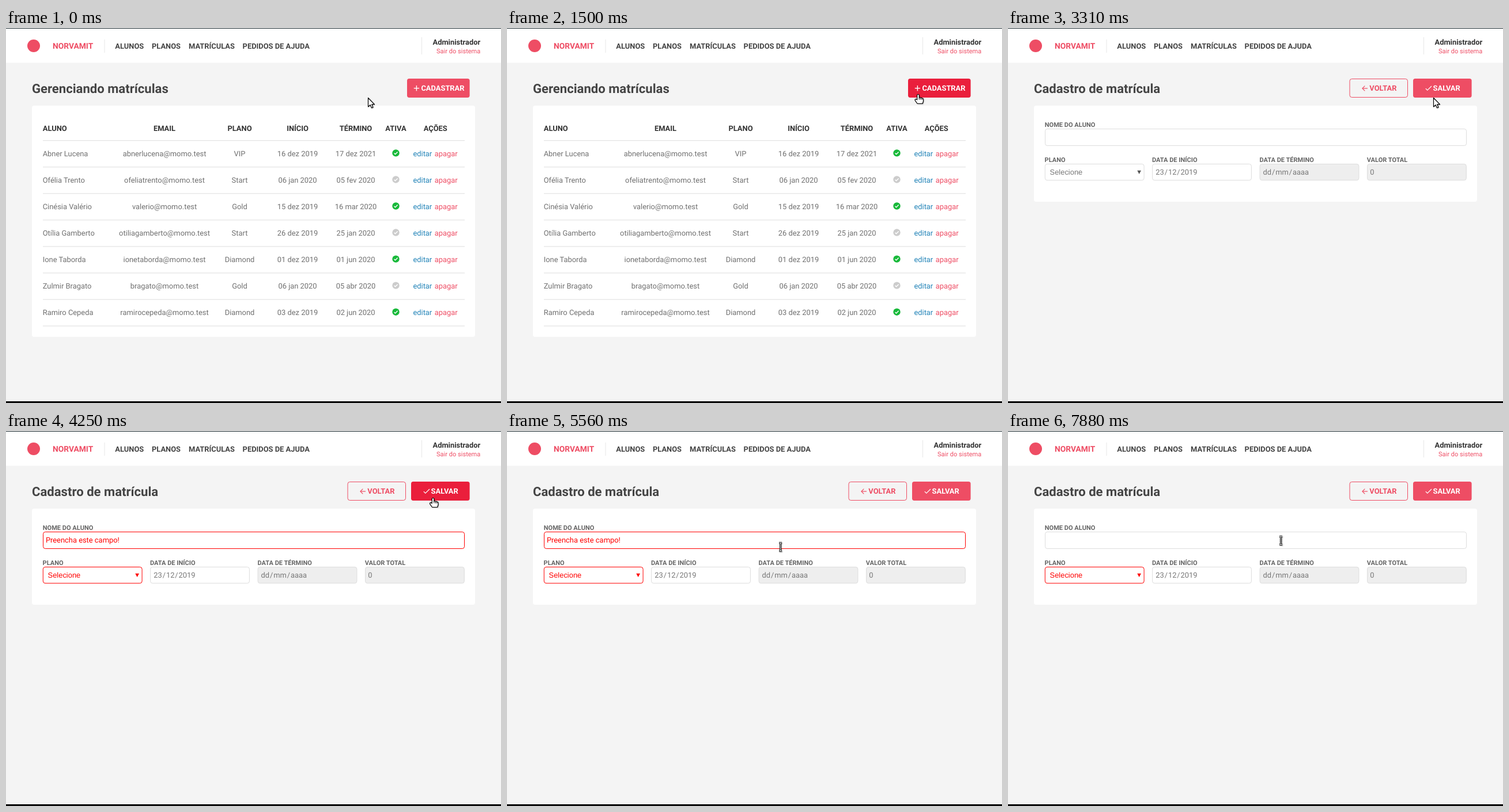
Write an HTML page with a canvas that moves like this. It is 859x652 px and loops after 8000 ms.

```html
<!DOCTYPE html>
<html lang="pt-BR">
<head>
<meta charset="utf-8">
<title>Matrículas</title>
<style>
html, body { margin: 0; width: 100%; height: 100%; overflow: hidden; background: #f4f4f4; }
canvas { display: block; width: 859px; height: 652px; }
</style>
</head>
<body>
<canvas id="stage"></canvas>
<script>
const W = 859, H = 652, LOOP = 8000;
const canvas = document.getElementById('stage');
const ctx = canvas.getContext('2d');
const dpr = window.devicePixelRatio || 1;
canvas.width = W * dpr;
canvas.height = H * dpr;
ctx.textRendering = 'geometricPrecision';

const PINK = '#ee4d64', HOVER = '#ea1f3c', RED = '#ff0000', DARK = '#444', GRAY = '#707070';
const ROBOTO = 'Roboto, sans-serif', ARIAL = '"Liberation Sans", Arial, sans-serif';
const BODY = 12.9, SMALL = 11.05, ROW = 46.05;

const FORM_AT = 2560, ERROR_AT = 4250, FOCUS_AT = 6130;
const ADD_BTN = { x: 696, y: 88, w: 108.6, h: 33 };
const SAVE_BTN = { x: 703, y: 88, w: 101.6, h: 33 };
const NAME_FIELD = { x: 64.5, y: 175.5, w: 731, h: 29 };

const rows = [
  ['Abner Lucena', 'abnerlucena', 'VIP', '16 dez 2019', '17 dez 2021', true],
  ['Ofélia Trento', 'ofeliatrento', 'Start', '06 jan 2020', '05 fev 2020', false],
  ['Cinésia Valério', 'valerio', 'Gold', '15 dez 2019', '16 mar 2020', true],
  ['Otília Gamberto', 'otiliagamberto', 'Start', '26 dez 2019', '25 jan 2020', false],
  ['Ione Taborda', 'ionetaborda', 'Diamond', '01 dez 2019', '01 jun 2020', true],
  ['Zulmir Bragato', 'bragato', 'Gold', '06 jan 2020', '05 abr 2020', false],
  ['Ramiro Cepeda', 'ramirocepeda', 'Diamond', '03 dez 2019', '02 jun 2020', true]
];

// Pointer moves: start, end, number of steps, target x and y, easing power
const moves = [
  [1130, 1500, 7, 713.5, 115.5, 2],
  [2560, 2560, 1, 725.5, 110, 1],
  [2690, 3310, 9, 738.5, 121.5, 1],
  [3440, 3500, 2, 741, 116.5, 1],
  [4750, 4940, 3, 746, 119.5, 1],
  [5250, 5560, 4, 474.5, 201.5, 2],
  [5690, 5690, 1, 474.5, 202.5, 1],
  [5880, 6130, 3, 474.5, 191.5, 1],
  [6310, 6310, 1, 473.5, 190.5, 1]
];

function pointerAt(t) {
  let x = 628.5, y = 121.5;
  for (const [start, end, n, tx, ty, power] of moves) {
    if (t < start) break;
    const gap = n > 1 ? (end - start) / (n - 1) : 1;
    const step = Math.min(n, Math.floor((t - start) / gap + 1e-6) + 1);
    const p = 1 - Math.pow(1 - step / n, power);
    x += (tx - x) * p;
    y += (ty - y) * p;
  }
  return { x, y };
}

function inside(p, r) {
  return p.x >= r.x && p.x <= r.x + r.w && p.y >= r.y && p.y <= r.y + r.h;
}

function text(s, x, y, { size = BODY, color = GRAY, bold = false, align = 'left', face = ROBOTO } = {}) {
  ctx.font = `${bold ? 700 : 400} ${size}px ${face}`;
  ctx.fillStyle = color;
  ctx.textAlign = align;
  ctx.fillText(s, x, y);
  return ctx.measureText(s).width;
}

function rect(x, y, w, h, color) {
  ctx.fillStyle = color;
  ctx.fillRect(x, y, w, h);
}

function box({ x, y, w, h }, fill, stroke, r = 3.7) {
  ctx.beginPath();
  ctx.roundRect(x, y, w, h, r);
  if (fill) { ctx.fillStyle = fill; ctx.fill(); }
  if (stroke) { ctx.strokeStyle = stroke; ctx.lineWidth = 1; ctx.stroke(); }
}

function disc(x, y, r, color) {
  ctx.beginPath();
  ctx.arc(x, y, r, 0, Math.PI * 2);
  ctx.fillStyle = color;
  ctx.fill();
}

function line(points, color, width) {
  ctx.beginPath();
  points.forEach(([x, y]) => ctx.lineTo(x, y));
  ctx.strokeStyle = color;
  ctx.lineWidth = width;
  ctx.stroke();
}

function header() {
  rect(0, 0, W, H, '#f4f4f4');
  rect(0, 0, W, 60.5, '#fff');
  rect(0, 0, W, 1, '#1d2b30');
  rect(0, 649, W, 3, '#000');
  disc(48, 31, 11, PINK);
  text('NORVAMIT', 81, 36, { size: 13.8, bold: true, color: PINK });
  rect(170.5, 20, 1, 23, '#e8e8e8');
  rect(721, 16, 1, 30, '#e8e8e8');
  const nav = [['ALUNOS', 189.3], ['PLANOS', 253], ['MATRÍCULAS', 317], ['PEDIDOS DE AJUDA', 410.6]];
  nav.forEach(([s, x]) => text(s, x, 35.6, { bold: true, color: DARK }));
  text('Administrador', 823.3, 28.6, { bold: true, color: '#333', align: 'right' });
  text('Sair do sistema', 823.3, 43.6, { size: SMALL, color: PINK, align: 'right' });
}

function title(s) {
  text(s, 45, 112.6, { size: 22.1, bold: true, color: DARK });
}

function status(x, y, active) {
  disc(x, y, 6.2, active ? '#18b93a' : '#ccc');
  line([[x - 3, y + 0.2], [x - 1, y + 2.2], [x + 3.1, y - 2]], '#fff', 1.4);
}

function listPage(pointer) {
  title('Gerenciando matrículas');
  box(ADD_BTN, inside(pointer, ADD_BTN) ? HOVER : PINK);
  line([[707.8, 104.7], [717, 104.7]], '#fff', 1.4);
  line([[712.4, 100], [712.4, 109.4]], '#fff', 1.4);
  text('CADASTRAR', 720.4, 109.2, { bold: true, color: '#fff' });
  box({ x: 45, y: 135, w: 769, h: 402 }, '#fff');

  const head = { bold: true, color: '#333', align: 'center' };
  text('ALUNO', 63.7, 178.5, { ...head, align: 'left' });
  const cols = [['EMAIL', 275], ['PLANO', 405.5], ['INÍCIO', 506], ['TÉRMINO', 607], ['ATIVA', 676.5], ['AÇÕES', 745.2]];
  cols.forEach(([s, x]) => text(s, x, 178.5, head));
  for (let i = 0; i <= rows.length; i++) rect(64, 195.2 + i * ROW, 732, 1, '#ddd');

  rows.forEach(([name, mail, plan, start, end, active], i) => {
    const y = 222.7 + i * ROW;
    text(name, 63.7, y);
    [mail + '@momo.test', plan, start, end].forEach((s, k) => text(s, cols[k][1], y, { align: 'center' }));
    status(676.5, y - 5.3, active);
    text('editar', 706.4, y, { color: '#2384b8' });
    text('apagar', 743.8, y, { color: PINK });
  });
}

// Date inputs keep a small gap around each slash
function dateText(s, x, y) {
  s.split(/(\/)/).forEach(part => { x += text(part, x, y, { color: '#777' }) + 0.92; });
}

function label(s, x, y) {
  text(s, x, y, { size: SMALL, bold: true, color: '#666' });
}

function formPage(t, pointer) {
  const failed = t >= ERROR_AT, focused = t >= FOCUS_AT;
  title('Cadastro de matrícula');
  box({ x: 593, y: 88.5, w: 100.5, h: 32 }, null, PINK);
  line([[624, 105], [615, 105]], PINK, 1.2);
  line([[619.3, 100.6], [614.9, 105], [619.3, 109.4]], PINK, 1.2);
  text('VOLTAR', 627.3, 109.2, { bold: true, color: PINK });
  box(SAVE_BTN, inside(pointer, SAVE_BTN) ? HOVER : PINK);
  line([[724.8, 105.2], [727.8, 108.2], [735, 101]], '#fff', 1.2);
  text('SALVAR', 737.6, 109.2, { bold: true, color: '#fff' });
  box({ x: 45, y: 135, w: 769, h: 167 }, '#fff');

  label('NOME DO ALUNO', 63.7, 172.4);
  const nameError = failed && !focused;
  box(NAME_FIELD, '#fff', nameError ? RED : '#ddd');
  if (nameError) text('Preencha este campo!', 68.9, 194.3, { color: RED });
  if (focused && (t < 6750 || (t >= 7250 && t < 7880))) rect(69, 182, 1, 15, '#333');

  const fields = [['PLANO', 64], ['DATA DE INÍCIO', 250.3], ['DATA DE TÉRMINO', 436.8], ['VALOR TOTAL', 623.2]];
  fields.forEach(([s, x], i) => {
    label(s, x - 0.4, 233.2);
    box({ x: x + 0.3, y: 236.5, w: 171.8, h: 28.2 }, i > 1 ? '#eee' : '#fff', i === 0 && failed ? RED : '#ddd');
  });
  text('Selecione', 72.6, 255.1, { color: failed ? RED : '#777', face: ARIAL });
  ctx.beginPath();
  ctx.moveTo(224.3, 247.8);
  ctx.lineTo(231, 247.8);
  ctx.lineTo(227.6, 254);
  ctx.fillStyle = failed ? RED : '#555';
  ctx.fill();
  dateText('23/12/2019', 256.3, 255.1);
  dateText('dd/mm/aaaa', 442.6, 255.1);
  text('0', 628.3, 255.1, { color: '#777' });
}

const ARROW = new Path2D('M0 0V15.5L3.6 12.2L6 17.4L8.5 16.4L6.2 11.3H11Z');
const HAND = new Path2D('M-1.8 9.4V1.6Q-1.8 0 0 0Q1.8 0 1.8 1.6V5.6Q4 4.6 4.6 6.2Q6.6 5.4 7 6.8Q9 6.4 9 8.4V12L7.6 16H-1.4L-5.2 10.6Q-6 8.6-4.4 8.2Q-3 8-1.8 9.4Z');
const KNUCKLES = new Path2D('M1.8 5.6V9M4.4 6.4V9.2M6.8 7V9.4');
const BEAM = new Path2D('M-2.5-7H2.5M0-7V7M-2.5 7H2.5');

function drawPointer(p, onButton, onField) {
  ctx.save();
  ctx.translate(p.x, p.y);
  ctx.lineJoin = 'round';
  ctx.strokeStyle = '#000';
  ctx.shadowColor = 'rgba(0,0,0,.35)';
  ctx.shadowBlur = 2 * dpr;
  ctx.shadowOffsetX = ctx.shadowOffsetY = dpr;
  if (onField) {
    ctx.lineWidth = 3;
    ctx.stroke(BEAM);
    ctx.shadowColor = 'transparent';
    ctx.strokeStyle = '#fff';
    ctx.lineWidth = 1;
    ctx.stroke(BEAM);
  } else {
    const shape = onButton ? HAND : ARROW;
    ctx.fillStyle = '#fff';
    ctx.fill(shape);
    ctx.shadowColor = 'transparent';
    ctx.lineWidth = 1.2;
    ctx.stroke(shape);
    if (onButton) {
      ctx.lineWidth = 1;
      ctx.stroke(KNUCKLES);
    }
  }
  ctx.restore();
}

function draw(t) {
  const pointer = pointerAt(t), form = t >= FORM_AT;
  ctx.setTransform(dpr, 0, 0, dpr, 0, 0);
  header();
  if (form) formPage(t, pointer);
  else listPage(pointer);
  drawPointer(pointer, inside(pointer, form ? SAVE_BTN : ADD_BTN), form && inside(pointer, NAME_FIELD));
}

const began = performance.now();
function tick() {
  draw((performance.now() - began) % LOOP);
  requestAnimationFrame(tick);
}
tick();
</script>
</body>
</html>
```
